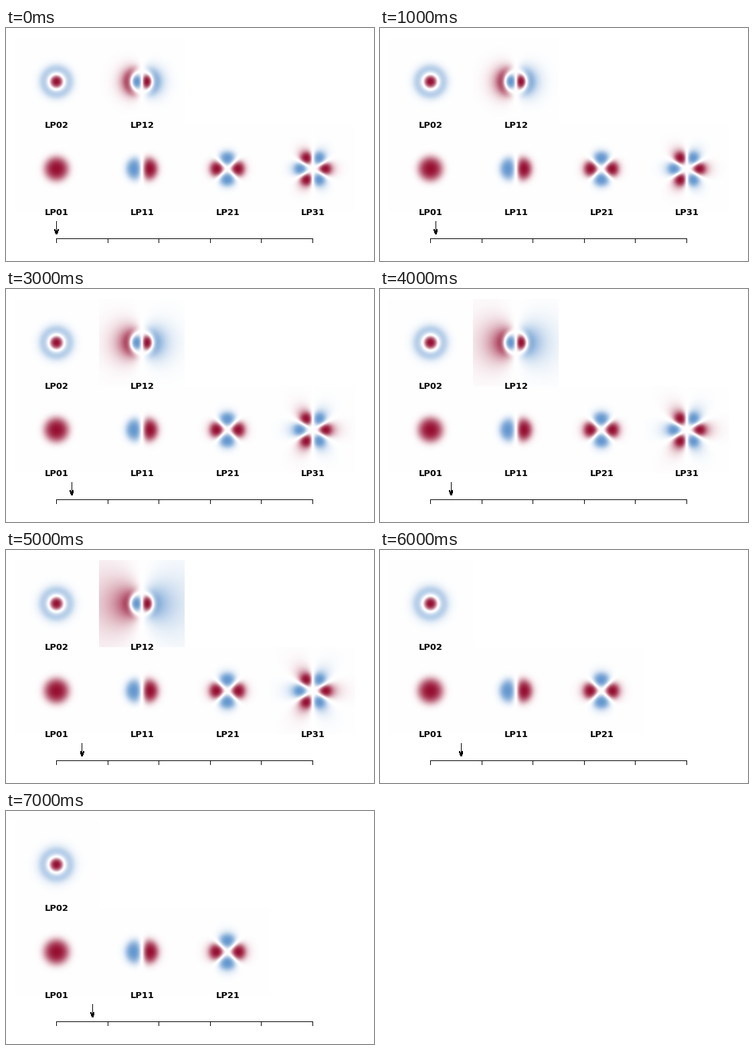
Animation of 550 by 350 pixels, one loop 8000 ms. Source, as a matplotlib script:

```python
import numpy as np
import matplotlib.pyplot as plt
from matplotlib.animation import FuncAnimation

WIDTH, HEIGHT, DPI = 550, 350, 100
PX = 72 / DPI
STEPS, INTERVAL = 8, 1000
AXIS_LEFT, AXIS_RIGHT, AXIS_Y = 75, 458, 316
PITCH_X, PITCH_Y = (AXIS_RIGHT - AXIS_LEFT) / 3, 131
PANEL_W, PANEL_H = 128, 131
CORE = 29
RED = np.array([150, 15, 50]) / 255
BLUE = np.array([100, 152, 208]) / 255

# name: azimuthal order, group, step-index cutoff, cladding decay W at the start,
#       drop of W per step, column, row, first step without the mode
MODES = {
    "LP01": (0, 1, 0.0, 6.9, 0.14, 0, 1, STEPS),
    "LP11": (1, 2, 2.405, 6.0, 0.155, 1, 1, STEPS),
    "LP21": (2, 3, 3.832, 4.7, 0.185, 2, 1, STEPS),
    "LP31": (3, 4, 5.136, 2.3, 0.42, 3, 1, 6),
    "LP02": (0, 3, 3.832, 4.5, 0.17, 0, 0, STEPS),
    "LP12": (1, 4, 5.520, 2.3, 0.42, 1, 0, 6),
}

RADII = np.linspace(0, 96, 385)
TERMS = 45
T = np.linspace(0, 8, 500)


def bessel_k(order, x):
    x = np.asarray(x, float)[..., None]
    return (np.exp(-x * np.cosh(T)) * np.cosh(order * T)).sum(axis=-1) * T[1]


def core_series(order, v, w):
    """Power series of the field in a core with index profile 1 - rho^4."""
    c = np.zeros(TERMS)
    c[0] = 1
    for k in range(1, TERMS):
        quartic = v**2 * c[k - 3] if k >= 3 else 0
        c[k] = (quartic - (v**2 - w**2) * c[k - 1]) / (4 * k * (k + order))
    return c, order + 2 * np.arange(TERMS)


def solve_v(order, group, cutoff, w):
    """Fibre parameter V that joins the core smoothly to a cladding decay W."""
    k0, k1 = bessel_k(order, w), bessel_k(order + 1, w)

    def mismatch(v):
        c, power = core_series(order, v, w)
        return (c * power).sum() * k0 - c.sum() * (order * k0 - w * k1)

    # step-index and parabolic profiles bound the root
    low, high = np.hypot(cutoff, w), group + np.hypot(group, w)
    sign = np.sign(mismatch(low))
    for _ in range(40):
        mid = (low + high) / 2
        if np.sign(mismatch(mid)) == sign:
            low = mid
        else:
            high = mid
    return (low + high) / 2


def radial_field(order, group, cutoff, w):
    c, power = core_series(order, solve_v(order, group, cutoff, w), w)
    rho = RADII / CORE
    core = (c * np.minimum(rho, 1)[:, None] ** power).sum(axis=1)
    tail = bessel_k(order, w * np.maximum(rho, 1)) / bessel_k(order, w)
    field = core * tail
    return field / np.abs(field).max()


def tint(field):
    """White at zero, red for positive and blue for negative values."""
    shade = (1 - np.exp(-2 * np.abs(field) ** 1.6)) / (1 - np.exp(-2))
    hue = np.where(field[..., None] > 0, RED, BLUE)
    return 1 - shade[..., None] * (1 - hue)


def panel_center(col, row):
    return AXIS_LEFT + 0.5 + PITCH_X * col, 80.5 + PITCH_Y * row


def paint_mode(canvas, name, step):
    order, group, cutoff, w0, drop, col, row, _ = MODES[name]
    cx, cy = panel_center(col, row)
    left, top = round(cx - PANEL_W / 2), round(cy - PANEL_H / 2)
    x = np.arange(left, left + PANEL_W) + 0.5 - cx
    y = np.arange(top, top + PANEL_H)[:, None] + 0.5 - cy
    r, phi = np.hypot(x, y), np.arctan2(y, x)
    profile = radial_field(order, group, cutoff, w0 - drop * step)
    field = np.interp(r, RADII, profile) * np.cos(order * phi)
    canvas[top:top + PANEL_H, left:left + PANEL_W] = tint(field)


fig = plt.figure(figsize=(WIDTH / DPI, HEIGHT / DPI), dpi=DPI, facecolor="white")
ax = fig.add_axes([0, 0, 1, 1])
image = ax.imshow(np.ones((HEIGHT, WIDTH, 3)), extent=(0, WIDTH, HEIGHT, 0),
                  interpolation="nearest", aspect="auto")
ax.set_xlim(0, WIDTH)
ax.set_ylim(HEIGHT, 0)
ax.axis("off")


def stroke(xs, ys, cap="projecting"):
    """One pixel wide black line, snapped to whole pixels."""
    line, = ax.plot(xs, ys, color="black", lw=PX, antialiased=False, snap=True,
                    solid_capstyle=cap, solid_joinstyle="round")
    return line


stroke([AXIS_LEFT, AXIS_RIGHT], [AXIS_Y, AXIS_Y])
for tick in np.linspace(AXIS_LEFT, AXIS_RIGHT, 6).round():
    stroke([tick, tick], [AXIS_Y, AXIS_Y + 6])

shaft = stroke([0, 0], [290, 309])
head = stroke([0, 0, 0], [302, 309, 302], cap="butt")

labels = {}
for name, mode in MODES.items():
    cx, cy = panel_center(mode[5], mode[6])
    labels[name] = ax.text(cx + 0.4, cy + 69.5, name, family="DejaVu Sans",
                           weight="bold", size=13 * PX, ha="center",
                           va="baseline", color="black")


def draw(step):
    canvas = np.ones((HEIGHT, WIDTH, 3))
    for name, mode in MODES.items():
        guided = step < mode[-1]
        labels[name].set_visible(guided)
        if guided:
            paint_mode(canvas, name, step)
    image.set_data(canvas)
    x = AXIS_LEFT + (AXIS_RIGHT - AXIS_LEFT) / 50 * step
    shaft.set_xdata(np.round([x, x]))
    head.set_xdata(np.round([x - 2.5, x, x + 2.5]))
    return [image, shaft, head, *labels.values()]


anim = FuncAnimation(fig, draw, frames=STEPS, interval=INTERVAL,
                     init_func=lambda: draw(0), repeat=True)
plt.show()
```
